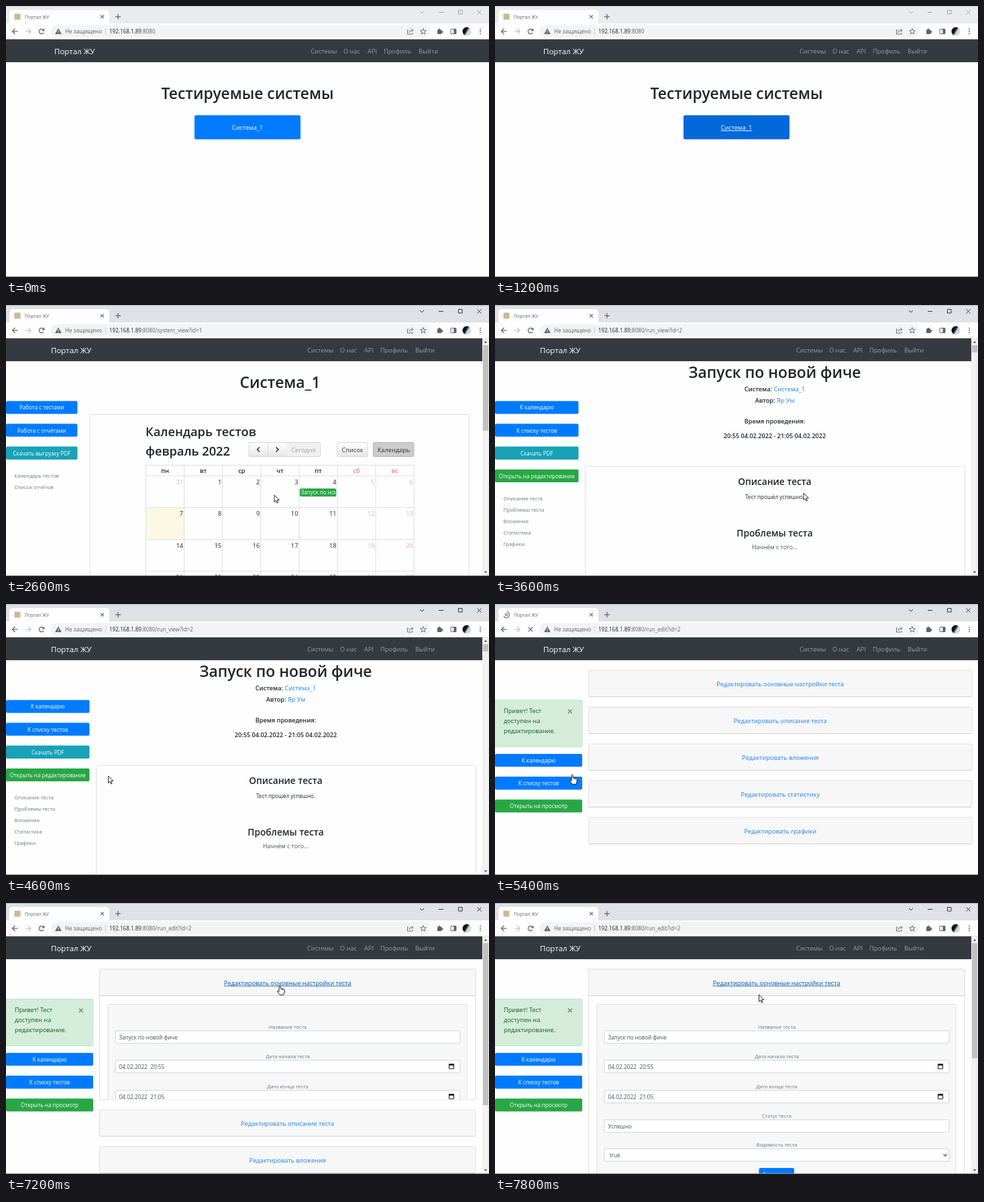
Write an HTML page with a canvas that moves like this. It is 720 by 405 pixels and loops after 8 s.

```html
<!DOCTYPE html>
<html lang="ru">
<head>
<meta charset="utf-8">
<title>Портал ЖУ</title>
<style>
html, body { margin: 0; width: 100%; height: 100%; overflow: hidden; background: #fff; }
canvas { position: fixed; left: 0; top: 0; width: 720px; height: 405px; }
</style>
</head>
<body>
<canvas id="stage" width="720" height="405"></canvas>
<script>
const g = document.getElementById('stage').getContext('2d');
const LOOP = 8000, STEP = 200;
const FAMILY = '"Open Sans", "Noto Sans", sans-serif';
const BRAND = 'Портал ЖУ';
const C = {
  page: '#fefefe', ink: '#212529', soft: '#6c757d', link: '#1a80f2', linkHover: '#0056b3',
  blue: '#007bff', teal: '#17a2b8', green: '#28a745', bar: '#343a40',
  line: '#dfdfdf', tint: '#f7f7f7', field: '#ced4da', value: '#495057', icon: '#5f6368'
};

// One size ratio per weight, so that the type sets as compactly as a UI font
function ratio(weight, sample, width) {
  g.font = `${weight} 100px ${FAMILY}`;
  return width / g.measureText(sample).width * 100;
}
let fit;
function calibrate() {
  fit = {
    400: ratio(400, 'Редактировать основные настройки теста', 190) / 10,
    600: ratio(600, 'Тестируемые системы', 257) / 25
  };
}

function text(s, x, y, size, color = C.ink, align = 'left', weight = 400, line = false) {
  g.font = `${weight} ${size * fit[weight]}px ${FAMILY}`;
  g.textAlign = align;
  g.fillStyle = color;
  g.fillText(s, x, y);
  const w = g.measureText(s).width;
  if (line) g.fillRect(align === 'center' ? x - w / 2 : x, y + 1, w, 0.8);
  return w;
}
const mid = (s, x, y, size, color, weight, line) => text(s, x, y, size, color, 'center', weight, line);

function rect(x, y, w, h, fill, r = 0, border) {
  g.beginPath();
  g.roundRect(x, y, w, h, r);
  if (fill) { g.fillStyle = fill; g.fill(); }
  if (border) { g.strokeStyle = border; g.lineWidth = 1; g.stroke(); }
}

function stroke(points, color, width = 1.2, close = false) {
  g.beginPath();
  points.forEach(([x, y], i) => i ? g.lineTo(x, y) : g.moveTo(x, y));
  if (close) g.closePath();
  g.strokeStyle = color;
  g.lineWidth = width;
  g.stroke();
}

function shape(points, fill, border) {
  g.beginPath();
  points.forEach(([x, y]) => g.lineTo(x, y));
  g.closePath();
  g.fillStyle = fill;
  g.fill();
  if (border) { g.strokeStyle = border; g.lineWidth = 0.9; g.stroke(); }
}

function disc(x, y, r, fill) {
  g.beginPath();
  g.arc(x, y, r, 0, 7);
  g.fillStyle = fill;
  g.fill();
}

function arc(x, y, r, a, b, color, width) {
  g.beginPath();
  g.arc(x, y, r, a, b);
  g.strokeStyle = color;
  g.lineWidth = width;
  g.stroke();
}

function cross(x, y, r, color, width) {
  stroke([[x - r, y - r], [x + r, y + r]], color, width);
  stroke([[x + r, y - r], [x - r, y + r]], color, width);
}

function arrow(x, dir, color) {
  stroke([[x - 4 * dir, 38], [x + 4 * dir, 38]], color);
  stroke([[x, 34], [x + 4 * dir, 38], [x, 42]], color);
}

function gradient(x0, y0, x1, y1, a, b, from = 0, to = 1) {
  const f = g.createLinearGradient(x0, y0, x1, y1);
  f.addColorStop(from, a);
  f.addColorStop(to, b);
  return f;
}

function browser(t, active, loading, path) {
  rect(0, 0, 720, 27, active ? '#dee1e6' : '#e9ebee');
  rect(0, 0, 720, 1, active ? '#b4b6ba' : '#cfd1d4');
  rect(5, 6, 149, 24, C.page, 5);
  rect(0, 26, 720, 23.5, C.page);
  if (loading) {
    disc(17, 16, 2.6, '#c9a880');
    const a = t / 180;
    arc(17, 16, 4.6, a, a + 4, '#5f6f80', 1.2);
  } else rect(12.5, 11.5, 9, 9, '#cdb890', 1);
  text(BRAND, 28, 18.7, 7.5, C.icon);
  cross(143.5, 16, 2.4, C.icon, 1.1);
  stroke([[163, 16], [171, 16]], C.icon);
  stroke([[167, 12], [167, 20]], C.icon);

  const ctl = active ? '#333' : '#a0a2a5';
  stroke([[617, 8], [620, 11], [623, 8]], ctl, 1);
  stroke([[645, 9.5], [652, 9.5]], ctl, 1);
  rect(674.5, 6.5, 5.5, 5.5, null, 0, ctl);
  cross(705.5, 9.5, 3, ctl, 1);

  arrow(13.5, -1, C.icon);
  arrow(33, 1, '#c0c2c5');
  if (loading) cross(53, 38, 3.4, C.icon, 1.2);
  else {
    arc(53, 38, 3.6, 0.5, 5.5, C.icon, 1.3);
    shape([[57.5, 33.5], [57.5, 37.6], [53.4, 37.6]], C.icon);
  }
  rect(67, 28.5, 566, 18.5, '#f1f3f4', 9.2);
  shape([[78, 33.5], [82.8, 42], [73.2, 42]], C.icon);
  rect(77.5, 36.5, 1, 2.8, '#fff');
  rect(77.5, 40, 1, 1, '#fff');
  text('Не защищено', 88, 41, 8.75, C.icon);
  rect(148, 33, 0.8, 10, '#bdc1c6');
  const w = text('192.168.1.89', 154, 41, 8.75, '#202124');
  text(':8080' + path, 154 + w, 41, 8.75, C.icon);

  stroke([[600, 36], [598.5, 36], [598.5, 42], [606, 42], [606, 40]], C.icon, 0.9);
  stroke([[601, 40], [602, 37], [606.5, 36.5]], C.icon, 0.9);
  stroke([[604.5, 34], [607, 36.5], [604.5, 39]], C.icon, 0.9);
  const star = [...Array(10)].map((_, i) => {
    const r = i % 2 ? 2 : 4.6, a = i * Math.PI / 5;
    return [622 + r * Math.sin(a), 38.2 - r * Math.cos(a)];
  });
  stroke(star, C.icon, 0.9, true);
  rect(643, 35.5, 6.5, 6.5, C.icon, 0.8);
  disc(646, 35.3, 1.5, C.icon);
  disc(650, 38.8, 1.5, C.icon);
  rect(663, 34.5, 8, 7, null, 0.6, C.icon);
  rect(667.5, 34.5, 3.5, 7, C.icon);
  disc(687, 38, 6.5, gradient(682, 35, 692, 41, '#0c1016', '#cfdce4', 0.35, 0.65));
  for (const y of [34.8, 38, 41.2]) disc(707, y, 0.95, C.icon);
}

function navbar(scrolled) {
  const d = scrolled ? -5 : 0;
  rect(0, 49.5, 720, 34.5, C.bar);
  text(BRAND, 72 + d, 71.7, 12.5, '#fff');
  const links = { 'Системы': 454, 'О нас': 503, 'API': 539, 'Профиль': 563, 'Выйти': 615 };
  for (const s in links) text(s, links[s] + d, 71, 10, '#9a9da0');
}

function scrollbar(size) {
  rect(710, 49.5, 10, 355.5, '#f1f1f1');
  rect(711, 60, 8, size, '#c1c1c1');
  shape([[712.8, 56.5], [717.2, 56.5], [715, 53.8]], '#505050');
  shape([[712.8, 398], [717.2, 398], [715, 400.7]], '#505050');
}

function buttons(list, w, top) {
  list.forEach(([s, color], i) => {
    const y = top + i * 34.1;
    rect(0, y, w, 19.3, color, 2);
    mid(s, w / 2, y + 13, 8.75, '#fff');
  });
}

const menu = (list, top) => list.forEach((s, i) => text(s, 12.5, top + i * 17, 8.3, C.soft));

function homePage(t) {
  navbar(false);
  mid('Тестируемые системы', 360, 138.5, 25, C.ink, 600);
  const p = Math.min(1, Math.max(0, t / 400 - 0.5));
  rect(281, 163.3, 158, 36, `rgb(0,${123 - 18 * p},${255 - 38 * p})`, 2.5);
  mid('Система_1', 360, 185.2, 10, '#fff', 400, p > 0);
}

function calendar() {
  text('Календарь тестов', 208, 195.5, 20, C.ink, 'left', 600);
  text('февраль 2022', 208, 224.5, 20, C.ink, 'left', 600);
  const face = gradient(0, 206, 0, 226, '#fff', '#e6e6e6');
  rect(362, 205.5, 106.5, 21, face, 2, '#d4d4d4');
  rect(418.5, 206, 49.5, 20, '#f0f0f0');
  stroke([[378, 212.5], [374.5, 216], [378, 219.5]], '#333', 1.5);
  stroke([[402.5, 212.5], [406, 216], [402.5, 219.5]], '#333', 1.5);
  rect(390, 206, 0.8, 20, '#d4d4d4');
  mid('Сегодня', 443.5, 219.5, 10, '#a0a0a0');
  rect(493.5, 205.5, 45.5, 21, face, 2, '#d4d4d4');
  mid('Список', 516.5, 219.5, 10, '#333');
  rect(547.5, 205.5, 60.5, 21, '#ccc', 2, '#b4b4b4');
  mid('Календарь', 578, 219.5, 10, '#333');

  const x0 = 208.5, cw = 57.1, top = 255.3, rh = 47.5;
  rect(x0, top + rh, cw, rh, '#fcf8e3');
  for (let i = 0; i < 8; i++) rect(x0 + i * cw - 0.5, 239, 1, 166, '#ddd');
  rect(x0, 239, cw * 7, 1, '#ddd');
  ['пн', 'вт', 'ср', 'чт', 'пт', 'сб', 'вс'].forEach((s, i) =>
    mid(s, x0 + (i + 0.5) * cw, 250.8, 10, i > 4 ? '#f47c70' : C.ink, 600));
  for (let n = 0; n < 28; n++) {
    const col = n % 7, y = top + Math.floor(n / 7) * rh;
    if (!col) rect(x0, y - 0.5, cw * 7, 1, '#ddd');
    const color = !n ? '#bcbebf' : col > 4 ? '#f8a890' : C.ink;
    text(String(n || 31), x0 + (col + 1) * cw - 1.5, y + 12.6, 10, color, 'right');
  }
  rect(437.8, 274.3, 54.4, 12, C.green, 2);
  g.save();
  g.beginPath();
  g.rect(438, 274, 53, 13);
  g.clip();
  text('Запуск по новой фиче', 439.5, 283.4, 8.75, '#fff');
  g.restore();
}

function systemPage() {
  navbar(true);
  mid('Система_1', 408.5, 124, 25, C.ink, 600);
  buttons([['Работа с тестами', C.blue], ['Работа с отчётами', C.blue], ['Скачать выгрузку PDF', C.teal]], 106.5, 143.4);
  menu(['Календарь тестов', 'Список отчётов'], 258);
  rect(125, 163.5, 565.5, 260, C.page, 2, C.line);
  calendar();
  scrollbar(128);
}

function pair(label, value, y) {
  g.font = `600 ${10 * fit[600]}px ${FAMILY}`;
  const a = g.measureText(label).width;
  g.font = `400 ${10 * fit[400]}px ${FAMILY}`;
  const x = 417 - (a + g.measureText(value).width) / 2;
  text(label, x, y, 10, C.ink, 'left', 600);
  text(value, x + a, y, 10, C.link);
}

function runPage() {
  navbar(true);
  mid('Запуск по новой фиче', 417, 109.3, 25, C.ink, 600);
  pair('Система: ', 'Система_1', 129);
  pair('Автор: ', 'Яр Ум', 145.8);
  mid('Время проведения:', 417, 177, 10, C.ink, 600);
  mid('20:55 04.02.2022 - 21:05 04.02.2022', 417, 199.3, 10, C.ink, 600);
  buttons([['К календарю', C.blue], ['К списку тестов', C.blue], ['Скачать PDF', C.teal], ['Открыть на редактирование', C.green]], 124.5, 143.4);
  menu(['Описание теста', 'Проблемы теста', 'Вложения', 'Статистика', 'Графики'], 291.5);
  rect(134.5, 241, 566, 180, C.page, 2, C.line);
  mid('Описание теста', 417, 268.8, 15, C.ink, 600);
  mid('Тест прошёл успешно.', 417, 289.8, 8.75);
  mid('Проблемы теста', 417, 346, 15, C.ink, 600);
  mid('Начнём с того...', 417, 364.5, 9.6, C.value);
  scrollbar(11);
}

function form() {
  rect(152, 151.5, 535, 300, C.tint, 2, C.line);
  const rows = [
    ['Название теста', 'Запуск по новой фиче', 191],
    ['Дата начала теста', '04.02.2022  20:55', 235],
    ['Дата конца теста', '04.02.2022  21:05', 280],
    ['Статус теста', 'Успешно', 324],
    ['Видимость теста', 'true', 367.3]
  ];
  rows.forEach(([label, value, y], i) => {
    const date = i === 1 || i === 2;
    mid(label, 420, y - 3, 8.1, C.soft);
    rect(163, y, 514, 18.8, C.page, 1.5, C.field);
    text(value, i === 4 ? 171 : 168.5, y + 12.6, date ? 9 : 8.75, C.value);
    if (date) {
      rect(660.5, y + 6, 7, 6.8, null, 0.5, '#111');
      rect(660, y + 5.5, 8, 2.2, '#111');
    }
  });
  stroke([[668.5, 375.5], [671, 378], [673.5, 375.5]], C.value, 1.3);
  rect(393.5, 396, 52.5, 19.3, C.blue, 2);
  mid('Сохранить', 420, 409, 8.75, '#fff');
}

function editPage(t) {
  const full = t >= 5600;
  navbar(full);
  rect(-1, 143.5, 131, 70, '#d4edda', 2, '#c3e6cb');
  ['Привет! Тест', 'доступен на', 'редактирование.'].forEach((s, i) =>
    text(s, 13, 163 + i * 14.8, 10, '#155724'));
  cross(111.8, 160.5, 3, '#76867a', 1.3);
  buttons([['К календарю', C.blue], ['К списку тестов', C.blue], ['Открыть на просмотр', C.green]], 130, 224);

  const k = Math.min(1, Math.max(0, (t - 7000) / 400));
  const open = k * k * (3 - 2 * k), drop = open * 310;
  const w = full ? 560.5 : 571.5, cx = 139.5 + w / 2;
  const names = ['основные настройки теста', 'описание теста', 'вложения', 'статистику', 'графики'];
  const items = names.map(s => 'Редактировать ' + s);
  if (full) items.push('Удалить тест');
  items.forEach((s, i) => {
    const y = 99 + i * 55 + (i ? drop : 0);
    const hover = !i && t >= 6800;
    if (!i && open) {
      rect(139.5, y, w, 40 + drop, C.page, 2, C.line);
      g.save();
      g.beginPath();
      g.rect(139, 139, w, drop);
      g.clip();
      form();
      g.restore();
    }
    rect(139.5, y, w, 39.5, C.tint, 2, C.line);
    rect(140, y + 39, w - 1, 1, '#d0d0d0');
    mid(s, cx, y + 23.7, 10, hover ? C.linkHover : C.link, 400, hover);
  });
  if (full) scrollbar(312 - 140 * open);
}

const path = [
  [1600, 366, 190], [2600, 400, 284], [3200, 462, 280], [3600, 460, 281],
  [4600, 152.5, 257], [5000, 115, 255], [5400, 115, 255], [6200, 381.5, 209],
  [6800, 410, 121], [7200, 408, 123], [7800, 393.5, 137], [8000, 393, 138]
];

function pointer(t) {
  const i = path.findIndex(p => p[0] > t);
  if (i < 1) return;
  const [a, x, y] = path[i - 1], [b, u, v] = path[i];
  let k = (t - a) / (b - a);
  k = k * k * (3 - 2 * k);
  const px = x + (u - x) * k, py = y + (v - y) * k;
  const onEvent = t < 3600 && px > 438 && py < 287;
  const onButton = t >= 3600 && t < 5600 && px < 125;
  const onLink = t > 6200 && py < 130;
  g.save();
  g.translate(px, py);
  if (onEvent || onButton || onLink) hand();
  else shape([[0, 0], [0, 10.5], [2.4, 8.3], [4, 12], [5.6, 11.3], [4, 7.7], [7.3, 7.5]], '#fff', '#111');
  g.restore();
}

function hand() {
  shape([[-0.9, 0.5], [0.2, -0.4], [1.1, 0.5], [1.1, 4.6], [6.2, 5.6], [7.3, 6.8], [7, 11], [5.8, 14.3],
    [0.4, 14.3], [-3.4, 9.6], [-3.2, 8.3], [-0.9, 9.2]], '#fff', '#111');
  stroke([[3, 5.2], [3, 7.4]], '#111', 0.7);
  stroke([[5, 5.6], [5, 7.6]], '#111', 0.7);
}

const pages = [
  [0, '', homePage],
  [1600, '/system_view?id=1', systemPage],
  [3600, '/run_view?id=2', runPage],
  [5200, '/run_edit?id=2', editPage]
];
const loads = [[1400, 1600], [3400, 3600], [5000, 5600]];

function draw(t) {
  const [, url, page] = pages.filter(p => p[0] <= t).pop();
  rect(0, 0, 720, 405, C.page);
  page(t);
  browser(t, t >= 1400, loads.some(([a, b]) => t >= a && t < b), url);
  rect(0, 404, 720, 1, '#8a8c90');
  pointer(t);
}

const start = performance.now();
function tick() {
  const t = (performance.now() - start) % LOOP;
  calibrate();
  draw(Math.floor(t / STEP) * STEP);
  requestAnimationFrame(tick);
}
tick();
</script>
</body>
</html>
```
